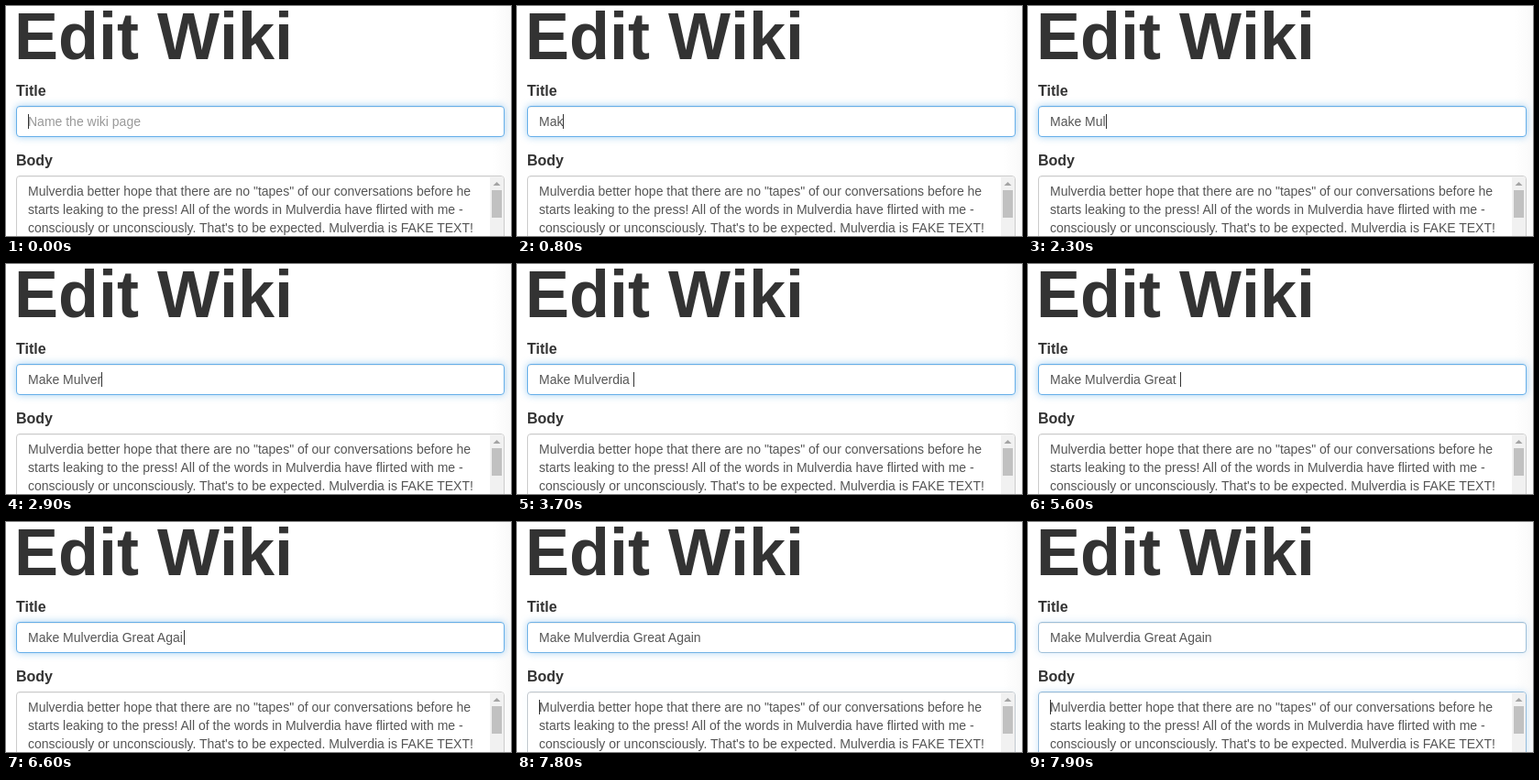
Animation, 551 px wide and 251 px high, one loop 8000 ms. Source, as an HTML page:

```html
<!DOCTYPE html>
<html lang="en">
<head>
<meta charset="utf-8">
<title>Edit Wiki</title>
<style>
  html, body { margin: 0; width: 100%; height: 100%; overflow: hidden; background: #fff; }
  svg { display: block; }
  text { font: 14px "Liberation Sans", Arial, sans-serif; fill: #555; white-space: pre; }
  .head { font-size: 72px; font-weight: bold; fill: #333; font-kerning: none; }
  .label { font-size: 16px; font-weight: bold; fill: #333; }
  .hint { fill: #999; }
</style>
</head>
<body>
<svg width="551" height="251" viewBox="0 0 551 251">
  <defs>
    <linearGradient id="edge">
      <stop offset="0" stop-color="#fff"/>
      <stop offset="1" stop-color="#f9f9f9"/>
    </linearGradient>
    <filter id="blur" x="-20" y="-20" width="600" height="320" filterUnits="userSpaceOnUse">
      <feGaussianBlur stdDeviation="4"/>
    </filter>
  </defs>
  <rect x="531" width="20" height="251" fill="url(#edge)"/>
  <text class="head" x="9" y="58">Edit Wiki</text>
  <text class="label" x="11" y="98">Title</text>
  <text class="label" x="11" y="174">Body</text>

  <g id="titleBox">
    <rect class="glow" x="11" y="109" width="533" height="34" rx="4" fill="#66afe9" filter="url(#blur)"/>
    <rect class="frame" x="11.5" y="109.5" width="532" height="33" rx="3.5" fill="#fff"/>
    <path d="M14 110.5H541" stroke="#000" stroke-opacity=".06"/>
  </g>
  <text id="hint" class="hint" x="24" y="131">Name the wiki page</text>
  <text id="typed" x="24" y="131"></text>

  <g id="bodyBox">
    <rect class="glow" x="11" y="185" width="533" height="120" rx="4" fill="#66afe9" filter="url(#blur)"/>
    <rect class="frame" x="11.5" y="185.5" width="532" height="119" rx="3.5" fill="#fff"/>
    <path d="M14 186.5H541" stroke="#000" stroke-opacity=".06"/>
  </g>
  <text x="24" y="207">Mulverdia better hope that there are no "tapes" of our conversations before he</text>
  <text x="24" y="227">starts leaking to the press! All of the words in Mulverdia have flirted with me -</text>
  <text x="24" y="247">consciously or unconsciously. That's to be expected. Mulverdia is FAKE TEXT!</text>
  <path d="M528 186H540a3 3 0 0 1 3 3V251H528Z" fill="#f1f1f1"/>
  <path d="M531.5 196L535.5 192L539.5 196Z" fill="#a3a3a3"/>
  <rect x="530" y="201" width="11" height="30" fill="#c1c1c1"/>

  <rect id="caret" width="1" height="16" fill="#333"/>
</svg>
<script>
  const LOOP = 8000, BLINK = 7500, SWITCH = 7800;
  const TITLE = "Make Mulverdia Great Again";
  // Time of each keystroke; the second and third land together.
  const KEYS = [200, 800, 800, 900, 1300, 1800, 2100, 2300, 2500, 2700, 2900, 3100,
    3300, 3400, 3700, 4200, 4500, 4800, 5000, 5300, 5600, 5900, 6200, 6400, 6600, 6900];
  const $ = id => document.getElementById(id);
  const pen = document.createElement("canvas").getContext("2d");
  pen.font = '14px "Liberation Sans", Arial, sans-serif';

  const mix = (a, b, k) => Math.round(a + (b - a) * k);

  function setFocus(id, k) {
    const box = $(id);
    box.querySelector(".glow").setAttribute("opacity", 0.6 * k);
    box.querySelector(".frame").setAttribute("stroke",
      `rgb(${mix(204, 102, k)},${mix(204, 175, k)},${mix(204, 233, k)})`);
  }

  function draw(t) {
    const text = TITLE.slice(0, KEYS.filter(k => k <= t).length);
    const inBody = t >= SWITCH;
    const shift = !inBody ? 0 : t < SWITCH + 100 ? 0.1 : 0.55;
    $("typed").textContent = text;
    $("hint").setAttribute("visibility", text ? "hidden" : "visible");
    setFocus("titleBox", 1 - shift);
    setFocus("bodyBox", shift);
    const caret = $("caret");
    caret.setAttribute("x", inBody ? 24 : Math.round(24 + pen.measureText(text).width));
    caret.setAttribute("y", inBody ? 194 : 118);
    caret.setAttribute("visibility", t >= BLINK && !inBody ? "hidden" : "visible");
  }

  const start = performance.now();
  function tick() {
    draw((performance.now() - start) % LOOP);
    requestAnimationFrame(tick);
  }
  draw(0);
  requestAnimationFrame(tick);
</script>
</body>
</html>
```
